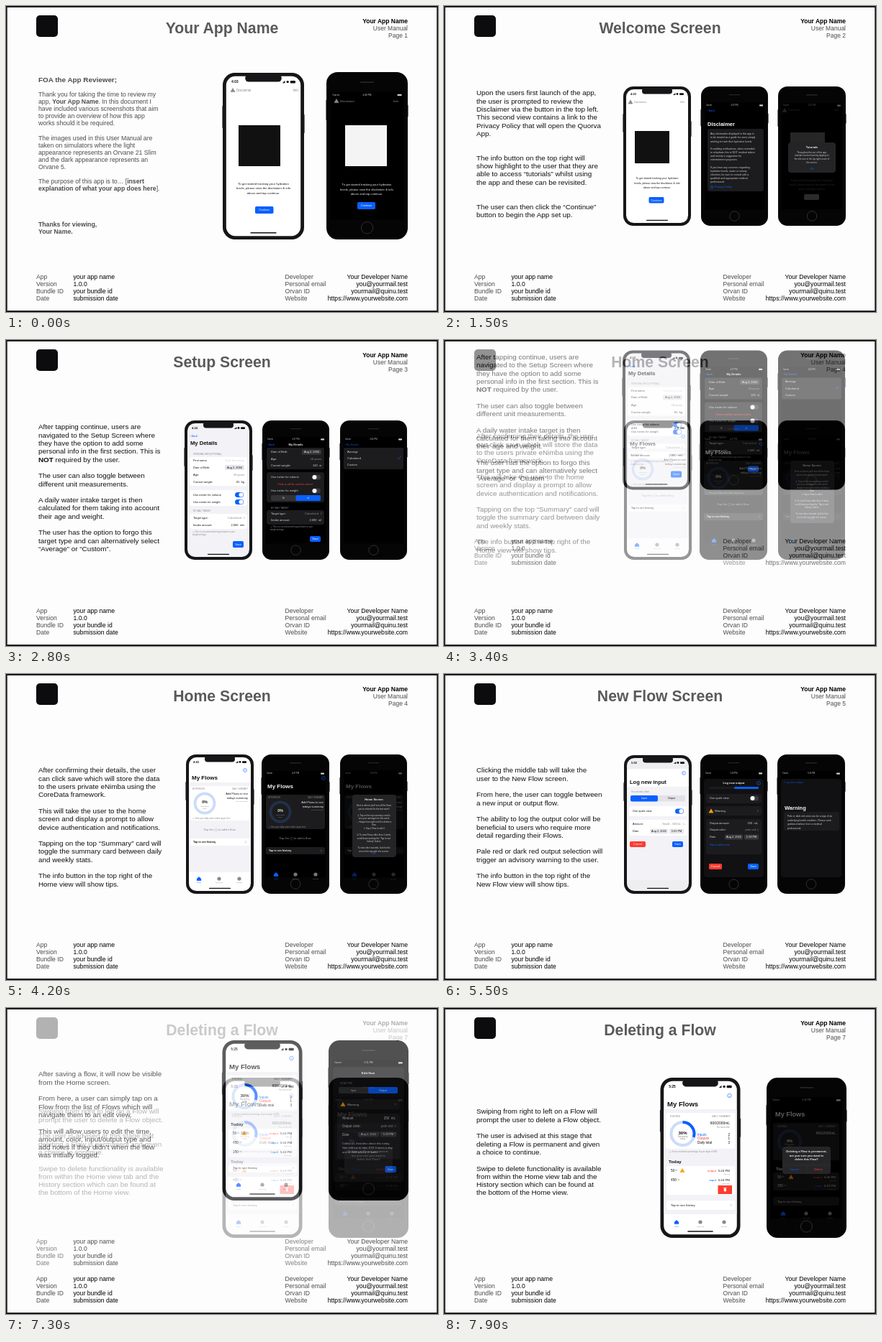
Recreate the animation shown at these times as an HTML page. Size 600x426 px, loop 8 s.

```html
<!DOCTYPE html>
<html lang="en">
<head>
<meta charset="utf-8">
<title>User Manual</title>
<style>
html, body { margin: 0; width: 100%; height: 100%; overflow: hidden; background: #fdfdfd; }
svg { position: absolute; left: 0; top: 0; width: 600px; height: 426px; overflow: hidden; }
text { font-family: "Liberation Sans", Helvetica, Arial, sans-serif; white-space: pre; }
</style>
</head>
<body>
<script>
const BLUE = '#0a60ff', RED = '#ff3b30', GRAY = '#8a8a8e', INK = '#111', PALE = '#d8d8dc';
const CARD = '#1c1c1e', GROUPED = '#f2f2f7', ORANGE = '#ff9f0a';

// ---- drawing helpers; text is placed by its vertical middle ----
const rect = (x, y, w, h, fill, r = 0) =>
  `<rect x="${x}" y="${y}" width="${w}" height="${h}" rx="${r}" fill="${fill}"/>`;
const circle = (x, y, r, fill, stroke = 'none', width = 1) =>
  `<circle cx="${x}" cy="${y}" r="${r}" fill="${fill}" stroke="${stroke}" stroke-width="${width}"/>`;
const path = (d, stroke, width, fill = 'none') =>
  `<path d="${d}" stroke="${stroke}" stroke-width="${width}" fill="${fill}"/>`;
const group = (opacity, content) => `<g opacity="${opacity}">${content}</g>`;
const escape = s => s.replace(/&/g, '&amp;');
const text = (x, y, s, size, fill, anchor = 'start', weight = 400) =>
  `<text x="${x}" y="${y + size * .355}" font-size="${size}" fill="${fill}" text-anchor="${anchor}" font-weight="${weight}">` +
  escape(s).replace(/\*(.+?)\*/g, '<tspan font-weight="700">$1</tspan>') + '</text>';
const bold = (x, y, s, size, fill, anchor) => text(x, y, s, size, fill, anchor, 700);
const mid = (x, y, s, size, fill) => text(x, y, s, size, fill, 'middle');
const lines = (x, y, pitch, s, size, fill, anchor) =>
  s.split('\n').map((line, i) => line && text(x, y + i * pitch, line, size, fill, anchor)).join('');
const row = (x1, x2, y, left, right, size, fill, rightFill = GRAY) =>
  text(x1, y, left, size, fill) + text(x2, y, right, size, rightFill, 'end');
const button = (x, y, w, h, label, fill = BLUE) =>
  rect(x, y, w, h, fill, 1.8) + mid(x + w / 2, y + h / 2, label, 3.8, '#fff');
const pill = (x, y, w, label, fill, ink) =>
  rect(x, y - 3.5, w, 7, fill, 1.6) + mid(x + w / 2, y, label, 3.9, ink);
const toggle = (x, y, on) =>
  rect(x, y - 3.5, 12, 7, on ? BLUE : '#39393d', 3.5) + circle(x + (on ? 8.5 : 3.5), y, 3, '#fff');
const warning = (x, y, fill) => path(`M${x} ${y - 2.6}l3 5.2h-6z`, fill, .6, fill);
const info = (x, y, r = 2.4) => circle(x, y, r, 'none', BLUE, .6) + mid(x, y, 'i', r * 1.6, BLUE);
const chevron = (x, y) => path(`M${x - 1} ${y - 1.6}l1.6 1.6l-1.6 1.6`, GRAY, .5);
const segments = (x, y, w, h, base, right, ink, labels = ['Input', 'Output']) =>
  rect(x, y, w, h, base, 2) + rect(x + (right ? w / 2 : 0), y, w / 2, h, BLUE, 2) +
  labels.map((s, i) => mid(x + w * (.25 + i / 2), y + h / 2, s, 3.4, i == right ? '#fff' : ink)).join('');
const ring = (x, y, r, width, base, part, ink, label) => {
  const a = part * 2 * Math.PI;
  return circle(x, y, r, 'none', base, width) +
    (part ? path(`M${x} ${y - r}A${r} ${r} 0 0 1 ${x + r * Math.sin(a)} ${y - r * Math.cos(a)}`, BLUE, width) : '') +
    bold(x, y - 1.5, label, r * .38, ink, 'middle') + mid(x, y + 4, 'Remaining', r * .18, GRAY) + mid(x, y + 7, 'today', r * .18, GRAY);
};

// ---- devices ----
const lightPhone = (x, y, w, h, time, screen = '#fff') => {
  const k = w / 94, c = x + w / 2, sy = y + 10.5 * k, end = x + w - 13 * k;
  return rect(x - .6, y + 38 * k, 2, 26 * k, '#222', 1) + rect(x + w - 1.4, y + 48 * k, 2, 22 * k, '#222', 1) +
    rect(x, y, w, h, '#161618', 14 * k) + rect(x + 4 * k, y + 4 * k, w - 8 * k, h - 8 * k, screen, 10.5 * k) +
    rect(c - 21 * k, y + 2 * k, 42 * k, 8.5 * k, '#161618', 4 * k) +
    bold(x + 14 * k, sy, time, 4 * k, INK, 'middle') +
    rect(end - 3 * k, sy - 1.3 * k, 6 * k, 2.8 * k, INK, 1) + circle(end - 6 * k, sy, 1.4 * k, INK) +
    path(`M${end - 12 * k} ${sy + 1.3 * k}h3.4v${-2.6 * k}z`, INK, .1, INK) +
    rect(c - 15 * k, y + h - 8.3 * k, 30 * k, 1.3 * k, INK, .6);
};
const darkPhone = (x, y, w, h, time, screen = '#000', ink = '#ccc') => {
  const k = w / 94, c = x + w / 2, sy = y + 26.5 * k;
  return rect(x - .6, y + 32 * k, 2, 24 * k, '#222', 1) + rect(x + w - 1.4, y + 38 * k, 2, 14 * k, '#222', 1) +
    rect(x, y, w, h, '#0a0a0b', 13 * k) + rect(x + 1, y + 1, w - 2, h - 2, '#050506', 12 * k) +
    rect(x + 5 * k, y + 23 * k, w - 10 * k, h - 46 * k, screen) +
    rect(c - 8 * k, y + 11 * k, 16 * k, 1.4 * k, '#242426', .7) +
    circle(c, y + h - 13.5 * k, 6.8 * k, '#050506', '#3c3c3f', .8) +
    text(x + 7 * k, sy, 'Carrier', 2.7 * k, ink) + mid(c, sy, time, 2.7 * k, ink) +
    rect(x + w - 12 * k, sy - 1, 5 * k, 2.2, ink, .6);
};
const tabs = (xs, y, gap, ink) => ['Home', 'New Flow', 'Settings'].map((s, i) => {
  const fill = i ? ink : BLUE, x = xs[i];
  return (i ? circle(x, y, 2.6, fill) : path(`M${x - 3} ${y}l3 -2.8l3 2.8v2.8h-6z`, fill, .2, fill)) + mid(x, y + gap, s, 2.4, fill);
}).join('');

// ---- page furniture ----
const page = (number, title, body, y, content) => {
  const first = number == 1, ink = '#4c4c4e';
  return rect(0, 0, 600, 426, '#fdfdfd') + rect(42, 13, 30, 30, '#0c0c0e', 5) +
    bold(300, 30.5, title, 21.2, '#5a5a5c', 'middle') +
    bold(558, 21, 'Your App Name', 8.5, '#000', 'end') +
    lines(558, 31, 10, 'User Manual\nPage ' + number, 8.5, ink, 'end') +
    lines(45, y, first ? 10.1 : 11.3, body, first ? 8.7 : 9.85, first ? ink : INK) +
    lines(42, 377, 10, 'App\nVersion\nBundle ID\nDate', 8.65, ink) +
    lines(93.5, 377, 10, 'your app name\n1.0.0\nyour bundle id\nsubmission date', 8.65, '#000') +
    lines(387.5, 377, 10, 'Developer\nPersonal email\nOrvan ID\nWebsite', 8.65, ink) +
    lines(558, 377, 10, 'Your Developer Name\nyou@yourmail.test\nyourmail@quinu.test\nhttps://www.yourwebsite.com', 8.65, '#000', 'end') +
    content;
};

// ---- screens ----
const intro = 'To get started tracking your hydration\nlevels, please view the disclaimer & info\nabove and tap continue.';
const welcome = (left, right, top, logo, c, textY, pitch, size, ink) =>
  warning(left + 1, top, GRAY) + row(left + 6, right, top, 'Disclaimer', 'Info', size * 1.03, GRAY) +
  rect(...logo, ink) + lines(c, textY, pitch, intro, size, ink, 'middle');

const welcomePage = lightPhone(301, 93, 113, 232, '4:03') +
  welcome(314, 406, 117, [323, 166, 58, 57], 357.5, 247, 6.8, 4.3, INK) + button(346, 279, 25.5, 10, 'Continue') +
  darkPhone(445, 92, 113, 233, '4:48 PM') +
  welcome(458, 545, 132, [471, 166, 58, 57], 501, 249, 6.2, 4.2, '#f4f4f4') + button(488, 273, 25, 10, 'Continue');

const disclaimer = `Any information displayed in this app is
to be treated as a guide for users simply
wishing to track their hydration levels.

If enabling notifications, when reminded
to rehydrate; this is NOT medical advice
and merely a suggestion for
entertainment purposes.

If you have any concerns regarding
hydration levels, water or urinary
retention, be sure to consult with a
qualified and appropriate medical
professional.`;
const disclaimerPage = lightPhone(249, 112, 94, 194, '4:03') +
  welcome(258, 334, 133.5, [265, 174, 48, 45], 296, 240, 6.4, 3.6, INK) + button(284.5, 266, 21, 8.5, 'Continue') +
  darkPhone(357, 112, 93, 194, '4:15 PM') + text(365, 145.5, '‹ Back', 4, BLUE) +
  bold(366, 164, 'Disclaimer', 7.5, '#fff') + rect(366, 171, 78, 87, CARD, 3) +
  lines(370, 178, 5.15, disclaimer, 3.5, '#ccc') + info(372, 252, 1.8) + text(376, 252, 'Privacy Policy', 3.8, BLUE) +
  darkPhone(464, 112, 94, 194, '4:15 PM', '#000', '#555') +
  group(.25, welcome(472, 548, 145, [481, 176, 48, 45], 511, 243, 6, 3.6, '#999') + rect(500, 262, 21, 8, '#aaa', 2)) +
  rect(478, 190, 66, 42, '#242426', 4) + bold(511, 196.5, 'Tutorials', 4, '#eee', 'middle') +
  lines(511, 203.5, 4.7, 'Throughout the use of this app,\ntutorials can be found by tapping on\nthe info icon in the top right corner of\nthe screen.', 3, '#ccc', 'middle') +
  mid(511, 227, 'OK', 3.6, BLUE);

const note = 'ⓘ This is a recommended target based on your\nweight and age.';
const setupPage = lightPhone(248, 112, 94, 194, '4:24', GROUPED) + text(255, 134, '‹ Back', 4, BLUE) +
  bold(256, 143.5, 'My Details', 7.6, INK) + text(260, 159, 'PERSONAL INFO (OPTIONAL)', 2.8, GRAY) +
  rect(255, 163, 80, 40, '#fff', 3) + row(260, 331, 168, 'First name', 'Your first name', 4, INK, '#ccc') +
  text(260, 177.5, 'Date of Birth:', 4, INK) + pill(304, 177.5, 27, 'Aug 2, 2004', '#e6e6ea', INK) +
  row(260, 331, 188, 'Age:', '18 years', 4, INK) + row(260, 331, 198, 'Current weight:', '65  kg', 4, INK, INK) +
  rect(255, 209, 80, 22, '#fff', 3) + text(260, 215.5, 'Use metric for volume', 4, INK) + toggle(318, 215.5, true) +
  text(260, 225.5, 'Use metric for weight', 4, INK) + toggle(318, 225.5, true) +
  text(260, 238, 'MY DAILY TARGET', 2.8, GRAY) + rect(255, 242, 80, 21, '#fff', 3) +
  row(260, 327, 247.5, 'Target type:', 'Calculated', 4, INK) + chevron(331, 247.5) +
  row(260, 331, 258, 'Intake amount:', '2,600  mls', 4, INK, INK) + lines(259, 267, 4, note, 2.8, GRAY) + button(315, 280, 15, 9, 'Save') +
  darkPhone(356, 112, 93, 194, '4:37 PM') + text(362, 145.5, '‹ Back', 4, BLUE) + bold(402.5, 145.5, 'My Details', 4, '#eee', 'middle') +
  rect(362, 150, 80, 30, CARD, 2) + text(368, 156, 'Date of Birth:', 4, PALE) + pill(411, 156, 27, 'Aug 2, 2004', '#38383b', '#eee') +
  row(368, 438, 165.5, 'Age:', '18 years', 4, PALE) + row(368, 438, 174.5, 'Current weight:', '120  st', 4, PALE, PALE) +
  rect(362, 184, 80, 42, CARD, 3) + text(368, 191, 'Use metric for volume', 4, PALE) + toggle(425, 191) +
  mid(402, 201, 'Fluid oz will be used for volume', 3.5, RED) + text(368, 210, 'Use metric for weight', 4, PALE) + toggle(425, 210) +
  segments(368, 216, 69, 8, '#333336', 1, PALE, ['lb', 'st']) + text(368, 234, 'MY DAILY TARGET', 2.8, GRAY) +
  rect(362, 237, 80, 20, CARD, 3) + row(368, 434, 241.5, 'Target type:', 'Calculated', 4, PALE) + chevron(438, 241.5) +
  row(368, 438, 251, 'Intake amount:', '2,600  ml', 4, PALE, PALE) + lines(367, 260.5, 4, note, 2.8, GRAY) + button(422, 273, 15, 8, 'Save') +
  darkPhone(464, 112, 93, 194, '4:41 PM') + text(470, 145.5, '‹ My Details', 3.8, '#0a4fcc') + rect(469, 150, 83, 30, CARD, 2) +
  lines(474, 155.5, 9.2, 'Average\nCalculated\nCustom', 4, PALE) + path('M544 164l1.5 1.6l3 -4', BLUE, .7);

const emptyHome = (x, y, ink, card, base) =>
  bold(x + 8, y, 'My Flows', 8, ink) + rect(x + 6, y + 12, 82, 48, card, 3) +
  row(x + 9, x + 86, y + 16, 'AFTERNOON', 'DAILY SUMMARY', 2.7, GRAY) +
  ring(x + 26, y + 36, 13.5, 3.8, base, 0, ink, '0%') +
  lines(x + 86, y + 23, 5.5, 'Add Flows to see\ntodays summary', 4, ink, 'end') + text(x + 86, y + 33.5, 'You can do this!', 2.5, GRAY, 'end') +
  text(x + 9, y + 57, 'ⓘ View your daily water intake target here', 2.8, GRAY) +
  mid(x + 47, y + 73, 'Tap the ⓘ to add a flow.', 4.2, GRAY) +
  rect(x + 6, y + 85, 82, 10, card, 2) + bold(x + 10, y + 90, 'Tap to see history', 3.7, ink) + chevron(x + 83, y + 90);
const homeTips = `Here is where you'll see all the flows
you've entered for the last week!

☝ Tap on the top summary card to
see your averages for this week
↔ Swipe from right to left to delete a
flow
✎ Tap a Flow to edit it

☰ To view Flows older than 1 week,
scroll down and tap the “Tap to see
history” button

To view other tutorials, look for the
icon in the top right of a screen.`;
const homePage = lightPhone(250, 112, 94, 194, '4:43') + rect(254, 151, 86, 125, GROUPED) +
  info(332, 134) + emptyHome(250, 144, INK, '#fff', '#cbdcf8') + tabs([268, 296, 324], 285, 5.5, GRAY) +
  darkPhone(355, 112, 94, 194, '4:47 PM') + info(441, 145) + emptyHome(355, 156, '#f2f2f2', CARD, '#22304a') + tabs([375, 402, 430], 279, 6, '#777') +
  darkPhone(464, 112, 93, 194, '4:48 PM', '#000', '#555') +
  group(.35, emptyHome(464, 156, '#ddd', CARD, '#22304a') + tabs([484, 511, 538], 279, 6, '#777')) +
  rect(481, 168, 61, 87, '#242426', 4) + bold(511, 174.5, 'Home Screen', 4, '#eee', 'middle') +
  lines(511, 183, 4.55, homeTips, 3, '#ccc', 'middle') + mid(511, 250, 'OK', 3.5, BLUE);

const flowPage = lightPhone(250, 113, 94, 193, '5:02', '#eeeef1') + rect(254, 132, 86, 146, '#fff', 5) + rect(254, 157, 86, 130, GROUPED) +
  info(333, 138) + bold(258, 150, 'Log new input', 7.5, INK) + text(260, 164, 'You selected a label', 2.8, GRAY) +
  segments(259, 169, 76, 8.5, '#e2e2e6', 0, INK) + rect(257, 184, 81, 14, '#fff', 3) + text(262, 191, 'Use quick view', 4, INK) + toggle(321, 191, true) +
  rect(257, 203, 81, 22, '#fff', 3) + row(262, 329, 209, 'Amount', 'Small - 100mL', 4, INK) + chevron(333, 209) +
  text(262, 219, 'Date', 4, INK) + pill(286, 219, 25, 'Aug 2, 2022', '#e8e8ec', INK) + pill(313, 219, 20, '5:01 PM', '#e8e8ec', INK) +
  button(258, 233, 22, 8, 'Cancel', RED) + button(317, 233, 15, 8, 'Save') +
  darkPhone(356, 112, 93, 194, '5:59 PM') + rect(361, 146, 83, 137, '#111113', 4) +
  bold(402.5, 152, 'Log new output', 4, '#eee', 'middle') + info(437, 152) + rect(368, 157, 35, 3, CARD) + rect(403, 157, 34, 3, BLUE, 1) +
  rect(364, 167, 77, 13, CARD, 3) + text(369, 173, 'Use quick view', 4, PALE) + toggle(425, 173) +
  rect(364, 184, 77, 13, CARD, 3) + warning(371, 190.5, ORANGE) + text(376, 190.5, 'Warning', 4, PALE) + chevron(436, 190.5) +
  rect(364, 202, 77, 49, CARD, 3) + row(369, 436, 207.5, 'Output amount:', '250  mL', 4, PALE, PALE) +
  row(369, 433, 217, 'Output color:', 'pale red', 4, PALE) + chevron(436, 217) +
  text(369, 227, 'Date', 4, PALE) + pill(390, 227, 25, 'Aug 2, 2022', '#38383b', '#eee') + pill(417, 227, 20, '5:19 PM', '#38383b', '#eee') +
  text(369, 238, 'Tap to add a note', 3.6, BLUE) + button(368, 264, 18, 8, 'Cancel', RED) + button(422, 264, 15, 8, 'Save') +
  darkPhone(463, 112, 94, 194, '5:24 PM') + rect(468, 146, 84, 137, '#111113', 4) + text(471, 151, '‹ Log new output', 3.8, '#0a4fcc') +
  bold(473, 186, 'Warning', 7.5, '#f4f4f4') + rect(472, 192, 77, 26, CARD, 3) +
  lines(477, 198, 5.5, 'Pale or dark red urine can be a sign of an\nunderlying health condition. Please seek\nguidance/advice from a medical\nprofessional.', 3.4, '#ccc');

const flowRow = (x1, x2, y, amount, kind, time, ink) =>
  text(x1, y, amount, 4.8, ink) + text(x1 + (amount.length > 2 ? 9 : 6), y + .4, 'mL', 2.8, GRAY) +
  text(x2, y, time, 4.4, ink, 'end') + text(x2 - 19, y, kind, 4.4, kind == 'input' ? BLUE : RED, 'end') +
  text(x2, y + 4.8, kind == 'input' ? 'quick view' : 'pale red', 2.4, GRAY, 'end');
const home = (deleting) => lightPhone(300.5, 97, 111, 223, '5:25') + rect(305.5, 141, 101, 146, GROUPED) +
  info(396.5, 122, 2.7) + bold(310, 133.5, 'My Flows', 9.6, INK) + rect(308, 146, 96, 50, '#fff', 3) +
  row(314, 398, 151, 'EVENING', 'DAILY SUMMARY', 3.2, GRAY) + ring(331.5, 175, 16, 4, '#cbdcf8', .3, INK, '30%') +
  text(397, 160.5, '600/2000mL', 4.9, INK, 'end') + text(397, 166, 'You can do this!', 2.6, GRAY, 'end') +
  [['Inputs', 2, BLUE], ['Outputs', 1, RED], ['Daily total', 3, INK]].map(([name, n, fill], i) =>
    text(352, 176 + i * 5.5, name, 4.6, fill) + text(397, 176 + i * 5.5, '' + n, 4.6, INK, 'end')).join('') +
  text(313, 200.5, 'ⓘ You’ve reached a percentage of your target of 30%', 2.8, GRAY) +
  bold(312, 214, 'Today', 6.2, INK) + rect(309, 220, 95, 40, '#fff', 3) +
  flowRow(315, 397, 226, '50', 'output', '5:24 PM', INK) + warning(331, 226, ORANGE) +
  flowRow(315, 397, 239, '450', 'input', '5:24 PM', INK) +
  (deleting ? rect(380.5, 247, 19.5, 12, RED) + rect(388.8, 251, 3.2, 4.3, '#fff', .6) + rect(388, 249.8, 4.8, .7, '#fff')
            : flowRow(315, 397, 252, '150', 'input', '5:24 PM', INK)) +
  rect(309, 268, 95, 13, '#fff', 3) + text(315, 274.5, 'Tap to see history', 4.3, INK) + chevron(399, 274.5) +
  tabs([323, 356, 389], 298, 6, GRAY);

const editPage = home() + darkPhone(448, 97, 111, 223, '5:31 PM') + rect(454, 134, 99, 160, '#111113', 4) +
  bold(503, 142, 'Edit flow', 4.4, '#eee', 'middle') + text(464, 157, 'FLOW TYPE', 3, GRAY) +
  segments(462, 162, 82, 9, '#333336', 1, PALE) +
  rect(460, 179, 87, 14, CARD, 3) + warning(468, 186, ORANGE) + text(474, 186, 'Warning', 4.4, PALE) + chevron(541, 186) +
  rect(460, 199, 87, 63, CARD, 3) + row(467, 541, 205.5, 'Amount', '250  mL', 4.5, PALE, PALE) +
  row(467, 537, 216.5, 'Output color:', 'pale red', 4.5, PALE) + chevron(541, 216.5) + text(467, 228, 'Date', 4.5, PALE) +
  pill(489, 228, 29, 'Aug 2, 2022', '#38383b', '#eee') + pill(520, 228, 22, '5:19 PM', '#38383b', '#eee') +
  lines(467, 240.5, 6.2, 'Called Dr. Soandso about this today.\nShe told me to take XYZ 3 times a day\nand to drink plenty of water...', 4.1, PALE) +
  button(526.5, 272, 15.5, 9, 'Save');

const deletePage = home(true) + darkPhone(448, 97, 111, 223, '5:36 PM', '#000', '#666') +
  group(.42, bold(460, 147.5, 'My Flows', 9.2, '#ddd') + rect(457, 160, 92, 52, CARD, 3) +
    row(463, 544, 165, 'EVENING', 'DAILY SUMMARY', 3, GRAY) + ring(480, 186, 15, 4, '#22304a', 0, '#ddd', '0%') +
    text(544, 174, '600/2000mL', 4.9, '#ddd', 'end') + bold(461, 224, 'Today', 6.2, '#ddd') + rect(457, 229, 92, 25, CARD, 3) +
    flowRow(463, 544, 235, '50', 'output', '5:36 PM', '#ddd') + warning(482, 235, ORANGE) +
    flowRow(463, 544, 247, '350', 'input', '5:19 PM', '#ddd') + rect(457, 263, 92, 12, CARD, 3) +
    text(463, 269, 'Tap to see history', 4.3, '#ddd') + tabs([471, 503, 536], 286, 6, '#888')) +
  rect(470, 193, 67, 38, '#262628', 4) +
  ['Deleting a Flow is permanent,', 'are you sure you want to', 'delete this Flow?'].map((s, i) => bold(503.5, 199.5 + i * 5.6, s, 4, '#eee', 'middle')).join('') +
  path('M470 219h67M503.5 219v12', '#3c3c40', .4) + mid(486.5, 225, 'Cancel', 4, BLUE) + mid(520, 225, 'Delete', 4, RED);

const pages = [
  page(1, 'Your App Name', `Thank you for taking the time to review my
app, *Your App Name*. In this document I
have included various screenshots that aim
to provide an overview of how this app
works should it be required.

The images used in this User Manual are
taken on simulators where the light
appearance represents an Orvane 21 Slim
and the dark appearance represents an
Orvane 5.

The purpose of this app is to… [*insert*
*explanation of what your app does here*].`, 123,
    bold(45, 102, 'FOA the App Reviewer;', 9.9, '#4c4c4e') + lines(45, 304, 10.4, '*Thanks for viewing,*\n*Your Name.*', 8.7, '#4c4c4e') + welcomePage),
  page(2, 'Welcome Screen', `Upon the users first launch of the app,
the user is prompted to review the
Disclaimer via the button in the top left.
This second view contains a link to the
Privacy Policy that will open the Quorva
App.


The info button on the top right will
show highlight to the user that they are
able to access “tutorials” whilst using
the app and these can be revisited.


The user can then click the “Continue”
button to begin the App set up.`, 121, disclaimerPage),
  page(3, 'Setup Screen', `After tapping continue, users are
navigated to the Setup Screen where
they have the option to add some
personal info in the first section. This is
*NOT* required by the user.

The user can also toggle between
different unit measurements.

A daily water intake target is then
calculated for them taking into account
their age and weight.

The user has the option to forgo this
target type and can alternatively select
“Average” or “Custom”.`, 121, setupPage),
  page(4, 'Home Screen', `After confirming their details, the user
can click save which will store the data
to the users private eNimba using the
CoreData framework.

This will take the user to the home
screen and display a prompt to allow
device authentication and notifications.

Tapping on the top “Summary” card will
toggle the summary card between daily
and weekly stats.

The info button in the top right of the
Home view will show tips.`, 134, homePage),
  page(5, 'New Flow Screen', `Clicking the middle tab will take the
user to the New Flow screen.

From here, the user can toggle between
a new input or output flow.

The ability to log the output color will be
beneficial to users who require more
detail regarding their Flows.

Pale red or dark red output selection will
trigger an advisory warning to the user.

The info button in the top right of the
New Flow view will show tips.`, 134, flowPage),
  page(6, 'Editing a Flow', `After saving a flow, it will now be visible
from the Home screen.

From here, a user can simply tap on a
Flow from the list of Flows which will
navigate them to an edit view.

This will allow users to edit the time,
amount, color, input/output type and
add notes if they didn’t when the flow
was initially logged.`, 144, editPage),
  page(7, 'Deleting a Flow', `Swiping from right to left on a Flow will
prompt the user to delete a Flow object.

The user is advised at this stage that
deleting a Flow is permanent and given
a choice to continue.

Swipe to delete functionality is available
from within the Home view tab and the
History section which can be found at
the bottom of the Home view.`, 144, deletePage)
];

document.body.innerHTML = '<svg viewBox="0 0 600 426">' + pages.map(p => `<g>${p}</g>`).reverse().join('') +
  '<rect x=".75" y="1" width="598.5" height="424" fill="none" stroke="#1c1a1c" stroke-width="2"/></svg>';
const layers = [...document.querySelectorAll('svg > g')].reverse();

// Each page lifts and fades away, uncovering the next one.
const LOOP = 8000, FIRST = 400, EVERY = 4000 / 3, LEAVE = 750, LIFT = 236;
const draw = now => {
  const time = now % LOOP;
  const progress = layers.map((_, i) => i == layers.length - 1 ? 0 :
    Math.min(1, Math.max(0, (time - FIRST - i * EVERY) / LEAVE)));
  const top = progress.findIndex(p => p < 1);
  layers.forEach((layer, i) => {
    const p = progress[i], shown = i == top || (i == top + 1 && progress[top] > 0);
    layer.style.display = shown ? '' : 'none';
    layer.setAttribute('opacity', 1 - p);
    layer.setAttribute('transform', `translate(0 ${-LIFT * (1 - Math.cos(Math.PI * p)) / 2})`);
  });
};
let start;
const tick = now => {
  start ??= now;
  draw(now - start);
  requestAnimationFrame(tick);
};
draw(0);
requestAnimationFrame(tick);
</script>
</body>
</html>
```
